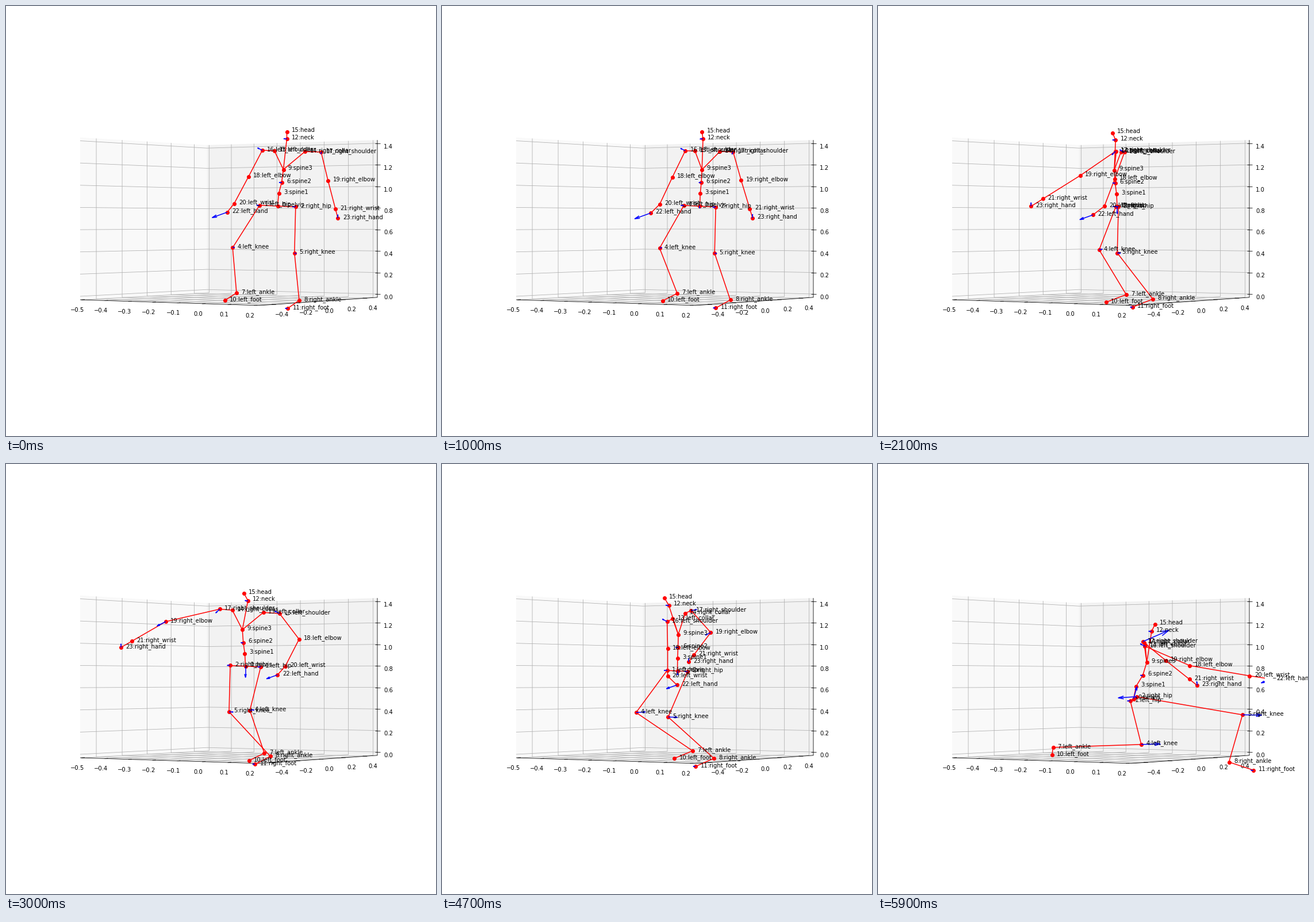
Write a matplotlib script that moves like this. It is 748 by 748 pixels and loops after 6000 ms.

```python
import numpy as np
import matplotlib.pyplot as plt
from matplotlib.animation import FuncAnimation
from matplotlib.collections import LineCollection

SIZE, DPI, FRAMES = 748, 68, 60
PX = 72 / DPI  # points per pixel
plt.rcParams["font.family"] = "DejaVu Sans"
plt.rcParams["font.size"] = 10 * PX

NAMES = ("pelvis left_hip right_hip spine1 left_knee right_knee spine2 "
         "left_ankle right_ankle spine3 left_foot right_foot neck left_collar "
         "right_collar head left_shoulder right_shoulder left_elbow "
         "right_elbow left_wrist right_wrist left_hand right_hand").split()
CHAINS = [(10, 7, 4, 1, 0, 2, 5, 8, 11), (0, 3, 6, 9, 12, 15),
          (9, 13, 16, 18, 20, 22), (9, 14, 17, 19, 21, 23)]


def path(*keys):
    """Smooth monotone curve through (time, value) pairs, for every frame."""
    times, values = np.array(keys, float).reshape(-1, 2).T
    rise = np.diff(values) / np.diff(times)
    a, b = rise[:-1], rise[1:]
    inner = np.where(a * b > 0, 2 * a * b / np.where(a + b, a + b, 1), 0)
    slope = np.concatenate([[0], inner, rise[-1:]])
    t = np.maximum(np.arange(FRAMES), times[0])
    k = np.clip(np.searchsorted(times, t, "right") - 1, 0, len(times) - 2)
    h = times[k + 1] - times[k]
    s = (t - times[k]) / h
    ease = s * s * (3 - 2 * s)
    return (values[k] * (1 - ease) + values[k + 1] * ease
            + h * s * (1 - s) * ((1 - s) * slope[k] - s * slope[k + 1]))


def vec(x, y):
    return np.stack(np.broadcast_arrays(x, y), axis=-1) + np.zeros((FRAMES, 2))


def limb(dx, drop, reach):
    """A bone that hangs by drop and rises as it swings out to reach."""
    return vec(dx, drop * np.sqrt(1 - (dx / reach) ** 2))


yaw = np.radians(path(1, 12, 10, 30, 21, 86, 30, 146, 38, 176, 47, 56, 59, 80))
kick = path(1, 0, 47, 0, 59, 1)


def move_body():
    """Joint paths in pixels, built outwards from the pelvis."""
    j = {0: vec(path(1, 472.5, 21, 416, 38, 417, 47, 409.5, 59, 444.5),
                path(1, 348, 21, 349, 38, 355.5, 47, 360, 53, 371, 59, 408.5))}

    # Spine and head
    lean = path(1, 10, 21, -5, 38, -5.5, 47, 1.5, 59, 23)
    j[3] = j[0] + vec(0.2 * lean, -22)
    j[6] = j[0] + vec(0.7 * lean, -41)
    j[9] = j[0] + vec(lean, -63.5)
    j[12] = j[9] + vec(path(1, 6, 15, 0, 38, 13.5, 47, -16.5, 59, 8.5),
                       path(1, -53.5, 21, -52.5, 38, -49.5, 59, -54))
    j[15] = j[12] + vec(path(1, 0, 30, -7, 38, -2.5, 47, -7.5, 59, 6), -12.5)

    # Hips and shoulders turn with the body
    chest = path(1, 14.5, 21, 10, 38, 15, 47, 1.5, 59, -5)
    tilt = path(1, -1.5, 21, 0.8, 38, 7, 47, 9.5, 59, 4)
    hip_half = vec(32 * np.cos(yaw), 1.5 * np.cos(yaw) - 4 * kick)
    half = vec(56 * np.cos(yaw + 0.21), -tilt)
    for side, left in ((-1, 1), (1, 0)):
        j[2 - left] = j[0] + side * hip_half
        j[14 - left] = j[9] + vec(0.75 * chest, -32) + side * half * 0.52
        j[17 - left] = j[9] + vec(chest, -32) + side * half

    # Arms
    upper = path(1, -24, 21, -17, 30, 34, 38, 32, 47, 1, 59, 78)
    fore = path(1, -25, 21, -18, 30, -24, 38, 34, 47, 0, 59, 104)
    j[18] = j[16] + limb(upper, 47, 112)
    j[20] = j[18] + limb(fore, 48, 112)
    j[22] = j[20] + (j[20] - j[18]) * 0.32
    j[22] += vec(path(1, -4, 21, -14, 47, 16, 59, 5), 0)

    upper = path(1, 12, 10, 14, 21, -61, 30, -94, 38, -102, 43, -78,
                 47, 34, 59, 40)
    fore = path(1, 13, 10, 15, 21, -65, 30, -59, 38, -89, 43, -82,
                47, -29, 51, 60, 59, 41)
    tuck = path(1, 1, 21, 1, 30, 0.8, 38, 1, 47, 0.8, 59, 0.7)
    j[19] = j[17] + limb(upper, 50 * tuck, 112)
    j[21] = j[19] + limb(fore, 50 * tuck, 112)
    j[23] = j[21] + (j[21] - j[19]) * 0.32

    # Legs
    j[4] = j[1] + limb(path(1, -47, 38, -15, 47, -54, 59, 19), 76, 200)
    j[5] = j[2] + limb(path(1, -2, 38, -2, 47, -34, 59, 184), 80.5, 200)
    j[7] = vec(path(1, 401, 38, 456, 47, 436, 59, 304.5),
               path(1, 499, 30, 503, 47, 499, 59, 493))
    j[8] = vec(path(1, 510, 38, 453, 47, 473, 59, 610.5),
               path(1, 512, 38, 508, 47, 512, 53, 527, 59, 518.5))
    toes = -16 - 19 * np.sin(yaw)
    j[10] = j[7] + vec(toes + 33 * kick, 13)
    j[11] = j[8] + vec(toes + 77 * kick, 14)
    return np.stack([j[n] for n in range(24)], axis=1)


def move_arrows():
    knee = path(1, 3, 30, 7, 38, 9, 47, 16, 59, 33)
    pull = path(1, 26, 10, 28, 30, 19, 38, 37, 47, 18, 59, 18)
    swing = path(1, 0, 21, 0, 30, 15, 38, 8, 47, 9, 59, 0)
    return {0: vec(6 * kick, path(1, 0, 38, 22, 47, 7, 59, -21)),
            1: vec(-5, 0), 2: vec(-5 - 27 * kick, 2 * kick),
            4: vec(knee, -1), 5: vec(knee, 0.5), 6: vec(-4, 0),
            11: vec(-4, 0), 12: vec(-5, 0), 16: vec(-8, -4),
            17: vec(path(1, 0, 21, -6), path(1, 3, 21, 6)),
            19: vec(-swing, swing / 2), 22: vec(-pull, 0.36 * pull),
            23: vec(0, -6)}


joints, arrows = move_body(), move_arrows()

fig = plt.figure(figsize=(SIZE / DPI, SIZE / DPI), dpi=DPI, facecolor="white")
ax = fig.add_axes([0.125, 0.11, 0.775, 0.77])
ax.set_xlim(0.125 * SIZE, 0.9 * SIZE)
ax.set_ylim(0.89 * SIZE, 0.12 * SIZE)
ax.axis("off")

X0, X1, Y0, Y1, Z0, Z1 = -0.51, 0.217, -0.521, 0.512, -0.031, 1.43


def project(x, y, z):
    """Perspective view of the room, in pixels."""
    u, v = (x - X0) / (X1 - X0), (y - Y0) / (Y1 - Y0)
    left, front, right = (np.array([px * w, w]) for px, w in
                          ((129, 0.00735), (441, 0.00685), (646, 0.00758)))
    across, depth = left + u * (front - left) + v * (right - front)
    return across / depth, 375 + (0.9555 - 1.42 * z) / depth


def lines(segments, color, width, z):
    ax.add_collection(LineCollection(segments, colors=color,
                                     linewidths=width * PX, zorder=z))


def label(x, y, value):
    ax.text(x, y, f"{value:.1f}".replace("-", "\u2212"),
            ha="center", va="baseline", zorder=3)


def draw_room():
    left, back, right, front = floor = [
        project(x, y, Z0) for x, y in ((X0, Y0), (X0, Y1), (X1, Y1), (X1, Y0))]
    left_top, back_top, right_top = (
        project(x, y, Z1) for x, y in ((X0, Y0), (X0, Y1), (X1, Y1)))
    for corners, shade in (((left, back, back_top, left_top), 0.975),
                           ((back, right, right_top, back_top), 0.95),
                           (floor, 0.9625)):
        ax.fill(*zip(*corners), color=str(shade), lw=0, zorder=0)

    grid, ticks = [], []
    for k in range(-5, 3):
        x = k / 10
        px, py = project(x, Y0, Z0)
        grid.append([project(x, Y1, Z1), project(x, Y1, Z0), (px, py)])
        ticks.append([(px - 2, py + 0.15), (px + 4, py - 0.3)])
        label(px - 8.5, py + 21, x)
    for k in range(-2, 3):
        y = k / 5
        px, py = project(X1, y, Z0)
        grid.append([project(X0, y, Z1), project(X0, y, Z0), (px, py)])
        ticks.append([(px - 5, py - 0.2), (px + 2.5, py + 0.1)])
        label(px + 12.8, py + 20.5, y)
    for k in range(8):
        z = k / 5
        px, py = project(X1, Y1, z)
        grid.append([project(X0, Y0, z), project(X0, Y1, z), (px, py)])
        ticks.append([(px - 4, py), (px + 4.5, py)])
        label(px + 19, py + 8.8, z)

    lines(grid, "#b0b0b0", 0.8, 1)
    lines([[left, front, right, right_top]], "black", 0.8, 2)
    lines(ticks, "black", 0.8, 2)


draw_room()
bones = LineCollection([], colors="red", linewidths=1.5 * PX, zorder=4)
quiver = LineCollection([], colors="blue", linewidths=1.5 * PX, zorder=6)
ax.add_collection(bones)
ax.add_collection(quiver)
dots, = ax.plot([], [], "o", color="red", ms=6 * PX, mew=PX, zorder=5)
tags = [ax.text(0, 0, f"{n}:{name}", va="baseline", zorder=7)
        for n, name in enumerate(NAMES)]


def arrow(start, v):
    """Shaft and two short head strokes."""
    tip, side = start + v, np.array([-v[1], v[0]]) * 0.078
    neck = tip - 0.29 * v
    return [[start, tip], [neck + side, tip, neck - side]]


def draw(i):
    p = joints[i]
    bones.set_segments([p[list(chain)] for chain in CHAINS])
    dots.set_data(p[:, 0], p[:, 1])
    quiver.set_segments([s for n, v in arrows.items()
                         if np.hypot(*v[i]) > 0.8 for s in arrow(p[n], v[i])])
    for tag, (x, y) in zip(tags, p):
        tag.set_position((x + 7.4 + 0.002 * x, y + 0.6))
    return [bones, dots, quiver, *tags]


anim = FuncAnimation(fig, draw, frames=FRAMES, interval=100, repeat=True,
                     repeat_delay=0, blit=False)
plt.show()
```
